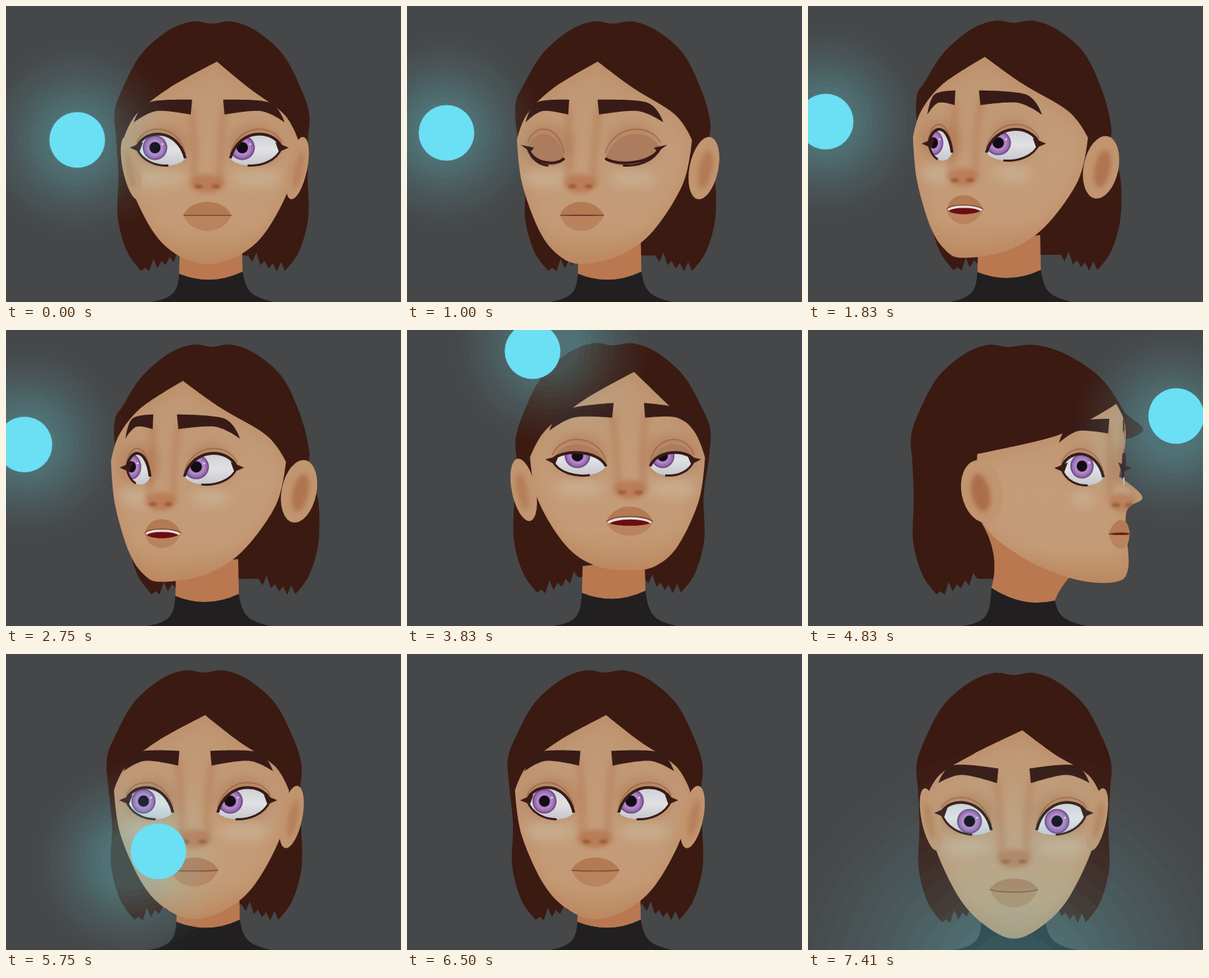
These frames come from a looping animation (560 px wide and 420 px high, 7.5 s). An HTML page with a canvas:

```html
<!DOCTYPE html>
<html lang="en">
<head>
<meta charset="utf-8">
<title>Following the light</title>
<style>
html, body { margin: 0; width: 100%; height: 100%; overflow: hidden; background: #464748; }
canvas { display: block; width: 560px; height: 420px; }
</style>
</head>
<body>
<canvas id="stage" width="560" height="420"></canvas>
<script>
const ctx = document.getElementById('stage').getContext('2d');
const LOOP = 7500, FRAMES = 90, MID = 292;
const DARK = '#381b17', SKIN = '#c49c79';

// Right halves of the head seen from the front; x counts from the middle.
const HAIR = [[0, 25], [28, 22], [62, 35], [100, 68], [126, 116], [138, 152], [136, 190], [134, 240], [135, 300], [122, 348], [102, 376]];
const FACE = [[56, 116], [105, 154], [124, 190], [114, 252], [80, 320], [43, 354]];
const BROW = [[22, 133], [24, 154], [74, 149], [107, 165], [86, 137]];
const PROFILE = [[437, 105], [448, 128], [450, 158], [441, 208], [474, 237], [451, 260], [454, 338],
  [432, 358], [372, 352], [300, 320], [245, 268], [240, 176], [346, 152], [400, 127]];

// yaw and pitch are sines of the head's turn.
const still = { yaw: -0.06, pitch: 0, shift: 0, gazeX: -14, gazeY: -3, lid: 0, brow: 0, open: 0 };
const pose = changes => ({ ...still, ...changes });
const turning = pose({ yaw: -0.41, gazeX: -8, open: 0.1 });
const farLeft = pose({ yaw: -0.65, pitch: -0.07, gazeX: -15, brow: -5, open: 1 });
const lookUp = pose({ yaw: 0.22, pitch: -0.2, gazeX: -8, gazeY: -6, lid: 0.27, brow: -6, open: 1 });
const side = pose({ yaw: 0.9, pitch: -0.06, gazeX: -6, gazeY: -5, open: 0.25 });
const lowLeft = pose({ yaw: -0.13, pitch: 0.08, shift: -11, brow: -5 });
const lookDown = pose({ yaw: 0, pitch: 0.3, gazeX: -1, gazeY: 4, brow: -6 });

const beats = [0, 12, 21, 33, 44, 49, 57, 60, 69, 80, 86];
const poses = [still, turning, farLeft, farLeft, lookUp, lookUp, side, side, lowLeft, lowLeft, lookDown];
const orbBeats = [0, 12, 21, 32, 46, 50, 58, 69, 73, 79];
const orbPath = [[101, 190], [56, 180], [25, 164], [25, 164], [178, 30], [315, 5], [522, 122], [216, 280], [40, 330], [-190, 360]];

const lerp = (a, b, t) => a + (b - a) * t;
const mix = (p, q, t) => p.map((v, i) => lerp(v, q[i], t));
const mirror = pts => pts.map(([x, y]) => [-x, y]).reverse();
const smooth = v => { const t = Math.max(0, Math.min(1, v)); return t * t * (3 - 2 * t); };

// Monotone cubic interpolation: no overshoot, and equal keys hold still.
function track(keys, vals, f) {
  const last = keys.length - 1;
  if (f >= keys[last]) return vals[last];
  let i = 0;
  while (f >= keys[i + 1]) i++;
  const slope = k => (vals[k + 1] - vals[k]) / (keys[k + 1] - keys[k]);
  const tangent = k => {
    if (k === 0 || k === last) return 0;
    const a = slope(k - 1), b = slope(k);
    return a * b <= 0 ? 0 : 2 * a * b / (a + b);
  };
  const h = keys[i + 1] - keys[i], t = (f - keys[i]) / h, u = 1 - t;
  return u * u * (1 + 2 * t) * vals[i] + t * t * (3 - 2 * t) * vals[i + 1]
    + h * t * u * (u * tangent(i) - t * tangent(i + 1));
}

function headAt(f) {
  const h = {};
  for (const k in still) h[k] = track(beats, poses.map(p => p[k]), f);
  h.lid = Math.max(h.lid, track([0, 9, 12, 13, 17], [0, 0, 1, 1, 0], f));
  h.turn = smooth((h.yaw - 0.3) / 0.6);
  h.cos = Math.sqrt(1 - h.yaw * h.yaw);
  return h;
}

// A feature on the front of the head, turned with it.
function feature(h, x, y, out = 0) {
  const z = 112 - 0.45 * Math.abs(x) + out;
  return [MID + h.shift + 53 * h.turn + x * h.cos + z * h.yaw, y + (z + 16) * h.pitch];
}

// Outline points slide with the turn: most at the middle, least at the rim.
function outline(h, [x, y]) {
  const z = 110 - 0.65 * Math.abs(x) - 0.4 * Math.max(0, 130 - y);
  return [MID + h.shift + x + z * h.yaw, y + (z + 16) * h.pitch];
}

function hairPoint(h, [x, y]) {
  const low = y > 170, front = 1 - h.turn;
  const spread = x <= 0 ? x : low ? lerp(x, -20, h.turn) : x * (1 + 0.3 * h.turn);
  const tip = 0.25 * h.yaw * x * Math.exp(-(((y - 160) / 45) ** 2));
  return [MID + h.shift + spread - 8 * h.turn - (y > 220 ? 25 * h.yaw * front : 0), y + 16 * h.pitch - tip * front];
}

function fill(path, color) { ctx.fillStyle = color; ctx.fill(path); }

function stroke(path, color, width) {
  ctx.strokeStyle = color;
  ctx.lineWidth = width;
  ctx.stroke(path);
}

function clipped(path, draw) {
  ctx.save();
  ctx.clip(path);
  draw();
  ctx.restore();
}

function soft(blur, draw) {
  ctx.filter = `blur(${blur}px)`;
  draw();
  ctx.filter = 'none';
}

function spline(pts, corners, closed) {
  const n = pts.length, path = new Path2D();
  const at = i => closed ? pts[(i + n) % n] : pts[Math.max(0, Math.min(n - 1, i))];
  const tan = i => corners.includes(i % n) ? [0, 0]
    : [0, 1].map(k => (at(i + 1)[k] - at(i - 1)[k]) / 6);
  path.moveTo(...pts[0]);
  for (let i = 0; i < (closed ? n : n - 1); i++) {
    const a = at(i), b = at(i + 1), s = tan(i), e = tan(i + 1);
    path.bezierCurveTo(a[0] + s[0], a[1] + s[1], b[0] - e[0], b[1] - e[1], ...b);
  }
  if (closed) path.closePath();
  return path;
}

// Arch from a to b whose crest lies near c.
function arch(path, a, b, c) {
  const y = (c[1] - (a[1] + b[1]) / 8) / 0.75;
  path.bezierCurveTo(lerp(a[0], c[0], 0.32), y, lerp(b[0], c[0], 0.32), y, ...b);
}

function bow(a, b, c) {
  const path = new Path2D();
  path.moveTo(...a);
  arch(path, a, b, c);
  return path;
}

function lens(a, b, top, low) {
  const path = bow(a, b, top);
  arch(path, b, a, low);
  path.closePath();
  return path;
}

function oval(x, y, rx, ry, tilt = 0) {
  const path = new Path2D();
  path.ellipse(x, y, Math.max(rx, 0), Math.max(ry, 0), tilt, 0, 7);
  return path;
}

function drawHair(h) {
  const pts = [...mirror(HAIR.slice(1)), ...HAIR].map(p => hairPoint(h, p));
  const path = spline(pts, [], false);
  const fringe = (a, b) => {
    const teeth = 10;
    for (let i = 1; i <= teeth; i++) {
      const [x, y] = mix(a, b, i / teeth);
      path.lineTo(x, y + (i === teeth ? 0 : i % 2 ? -6 - 5 * Math.sin(i * 2) : 5));
    }
  };
  fringe(pts[pts.length - 1], hairPoint(h, [44, 354]));
  path.lineTo(...hairPoint(h, [-44, 354]));
  fringe(hairPoint(h, [-44, 354]), pts[0]);
  fill(path, '#3b1a12');
}

function drawNeck(h) {
  const x = MID + h.shift * 0.3 + 9 * h.yaw * (1 - h.turn), y = 380 + Math.min(0, 35 * h.pitch);
  const at = (front, profile) => mix(front, profile, h.turn);
  const a = at([x - 45, 335], [244, 270]), b = at([x - 46, y], [260, 366]);
  const c = at([x + 44, y - 3], [350, 384]), d = at([x + 43, 325], [376, 345]);
  const neck = new Path2D();
  neck.moveTo(...a);
  neck.quadraticCurveTo((a[0] + b[0]) / 2 + 22 * h.turn, (a[1] + b[1]) / 2, ...b);
  neck.quadraticCurveTo((b[0] + c[0]) / 2, (b[1] + c[1]) / 2 + 20, ...c);
  neck.quadraticCurveTo((c[0] + d[0]) / 2 - 6 * h.turn, (c[1] + d[1]) / 2, ...d);
  const sweater = new Path2D();
  sweater.moveTo(...b);
  sweater.quadraticCurveTo((b[0] + c[0]) / 2, (b[1] + c[1]) / 2 + 20, ...c);
  sweater.bezierCurveTo(c[0] + 5, 408, c[0] + 14, 412, c[0] + 44, 420);
  sweater.lineTo(b[0] - 40, 420);
  sweater.bezierCurveTo(b[0] - 4, 414, b[0] - 2, 402, ...b);
  fill(neck, '#b97850');
  fill(sweater, '#211f20');
}

function drawEar(h, dir) {
  const rx = 13 - dir * h.yaw * 18, tilt = dir * 0.2;
  const x = MID + h.shift + 53 * h.turn + dir * 118 * h.cos - 52 * h.yaw, y = 230 + 16 * h.pitch;
  fill(oval(x, y, rx, 45, tilt), '#c1956f');
  if (rx > 8) soft(3, () => fill(oval(x + dir * 2, y + 2, rx * 0.45, 27, tilt), `rgba(160,90,55,${rx / 45})`));
}

function drawFace(h) {
  const front = [[12, 79], ...FACE, [0, 366], ...mirror(FACE)].map(p => outline(h, p));
  const pts = front.map((p, i) => mix(p, PROFILE[i], h.turn));
  const path = spline(pts, [0, 3, 11], true);
  const [nx, ny] = feature(h, 0, 250);
  const tone = ctx.createLinearGradient(0, pts[0][1], 0, pts[7][1]);
  tone.addColorStop(0, '#bf9672');
  tone.addColorStop(0.5, SKIN);
  tone.addColorStop(0.8, '#c49b76');
  tone.addColorStop(1, '#be8c64');
  fill(path, tone);
  clipped(path, () => {
    soft(8, () => {
      stroke(path, 'rgba(180,112,70,.2)', 14);
      for (const dir of [-1, 1]) {
        const [x, y] = feature(h, dir * 67, 198), half = 36 * h.cos;
        fill(oval(x, y, half + 3, 30), 'rgba(168,106,70,.4)');
        fill(oval(x, y + 46, half, 13), 'rgba(203,180,150,.7)');
      }
    });
    soft(4, () => {
      for (const dir of [-1, 1]) {
        const ridge = new Path2D(), [x, y] = feature(h, dir * 25, 140);
        ridge.moveTo(x, y);
        ridge.quadraticCurveTo((x + nx) / 2 + dir * 4, (y + ny) / 2, nx + dir * 18, ny);
        stroke(ridge, 'rgba(176,108,70,.4)', 9);
      }
    });
    const width = 24 * (0.6 + 0.4 * h.cos);
    soft(3, () => fill(oval(nx, ny + 2, width, 13), 'rgba(181,109,70,.65)'));
    soft(1.5, () => {
      for (const dir of [-1, 1]) fill(oval(nx + dir * width / 2, ny + 6, 6, 3), 'rgba(128,62,38,.5)');
    });
  });
}

function drawEye(h, dir) {
  const outer = feature(h, dir * 103, 201), inner = feature(h, dir * 32, 216);
  const [x, y] = feature(h, dir * 67, 204);
  const high = [x, y - 22], low = [x, y + 22], lid = [x, lerp(high[1], low[1] - 4 * h.lid, h.lid)];
  const width = Math.abs(outer[0] - inner[0]);
  const lift = ([px, py]) => [px, py - 7];
  stroke(bow(lift(outer), lift(inner), lift(high)), 'rgba(142,82,54,.5)', 2);
  if (h.lid > 0.05) fill(lens(outer, inner, high, low), '#ad7b5d');
  if (h.lid < 0.95) {
    const open = lens(outer, inner, lid, low);
    const white = ctx.createLinearGradient(0, high[1], 0, low[1]);
    white.addColorStop(0, '#cfd0d4');
    white.addColorStop(0.5, '#e1e1e4');
    white.addColorStop(1, '#c6c7cc');
    fill(open, white);
    clipped(open, () => {
      const gx = x + h.gazeX - dir * 5, gy = y + h.gazeY, r = 17, squeeze = 0.6 + 0.4 * width / 71;
      const ring = (scale, color) => fill(oval(gx, gy, r * scale * squeeze, r * scale), color);
      ring(1.04, '#74508a');
      ring(0.9, '#9b6fb2');
      ring(0.72, '#b283c6');
      ring(0.47, '#120c16');
      fill(oval(gx + 11 * squeeze, gy - 5, 1.3, 1.3), '#e8dcef');
    });
  }
  stroke(bow(outer, inner, lid), DARK, 4);
  ctx.setLineDash([width * 0.8, 999]);
  stroke(bow(outer, inner, low), DARK, 3);
  ctx.setLineDash([]);
  const wing = new Path2D();
  wing.moveTo(outer[0] - dir * 4, outer[1] + 6);
  wing.lineTo(outer[0] + dir * 10, outer[1] - 4 * h.lid);
  wing.lineTo(outer[0] - dir * 9, outer[1] - 8 * (1 - h.lid));
  fill(wing, DARK);
}

function drawBrow(h, dir) {
  fill(spline(BROW.map(([x, y]) => feature(h, dir * x, y + h.brow)), [0, 1, 3], true), DARK);
}

function drawMouth(h) {
  const a = feature(h, -34, 297, 10), b = feature(h, 34, 297, 10);
  const at = y => feature(h, 0, y, 8);
  const gapTop = at(297 - 5 * h.open), gapLow = at(297 + 8 * h.open);
  fill(lens(a, b, at(278), at(319)), '#b9835e');
  fill(lens(a, b, at(278), gapTop), '#b37a54');
  if (h.open > 0.05) {
    const inside = lens(a, b, gapTop, gapLow);
    fill(inside, '#6b0d15');
    if (h.open > 0.4) clipped(inside, () => stroke(bow(a, b, gapTop), '#e6dfdb', 8 * h.open));
  }
  stroke(bow(a, b, gapTop), '#7d4630', 1.4);
}

function glow(x, y, outer, inner) {
  const rings = 13;
  for (let i = 0; i < rings; i++) {
    const t = i / (rings - 1), r = lerp(outer, inner, t);
    fill(oval(x, y, r, r), `rgba(106,205,220,${0.008 + 0.036 * t})`);
  }
}

function draw(f) {
  const h = headAt(f), sides = [-1, 1];
  const behind = dir => dir * h.yaw < -0.1 || Math.abs(h.yaw) <= 0.1;
  ctx.fillStyle = '#464748';
  ctx.fillRect(0, 0, 560, 420);
  drawHair(h);
  drawNeck(h);
  for (const dir of sides) if (!behind(dir)) drawEar(h, dir);
  drawFace(h);
  for (const dir of sides) if (behind(dir)) drawEar(h, dir);
  for (const dir of sides) {
    drawEye(h, dir);
    drawBrow(h, dir);
  }
  drawMouth(h);

  const orbAt = time => [0, 1].map(k => track(orbBeats, orbPath.map(p => p[k]), time));
  glow(...orbAt(f + 1), 140, 42);
  fill(oval(...orbAt(f), 39.5, 39.5), '#6bdff3');
  const rise = track([0, 79, 86], [0, 0, 1], f);
  if (rise > 0) glow(MID, lerp(640, 470, rise), lerp(180, 335, rise), lerp(42, 75, rise));
}

let shown = -1;
function tick(now) {
  const f = Math.floor(((now % LOOP) + 4) / LOOP * FRAMES) % FRAMES;
  if (f !== shown) draw(shown = f);
  requestAnimationFrame(tick);
}
tick(performance.now());
</script>
</body>
</html>
```
